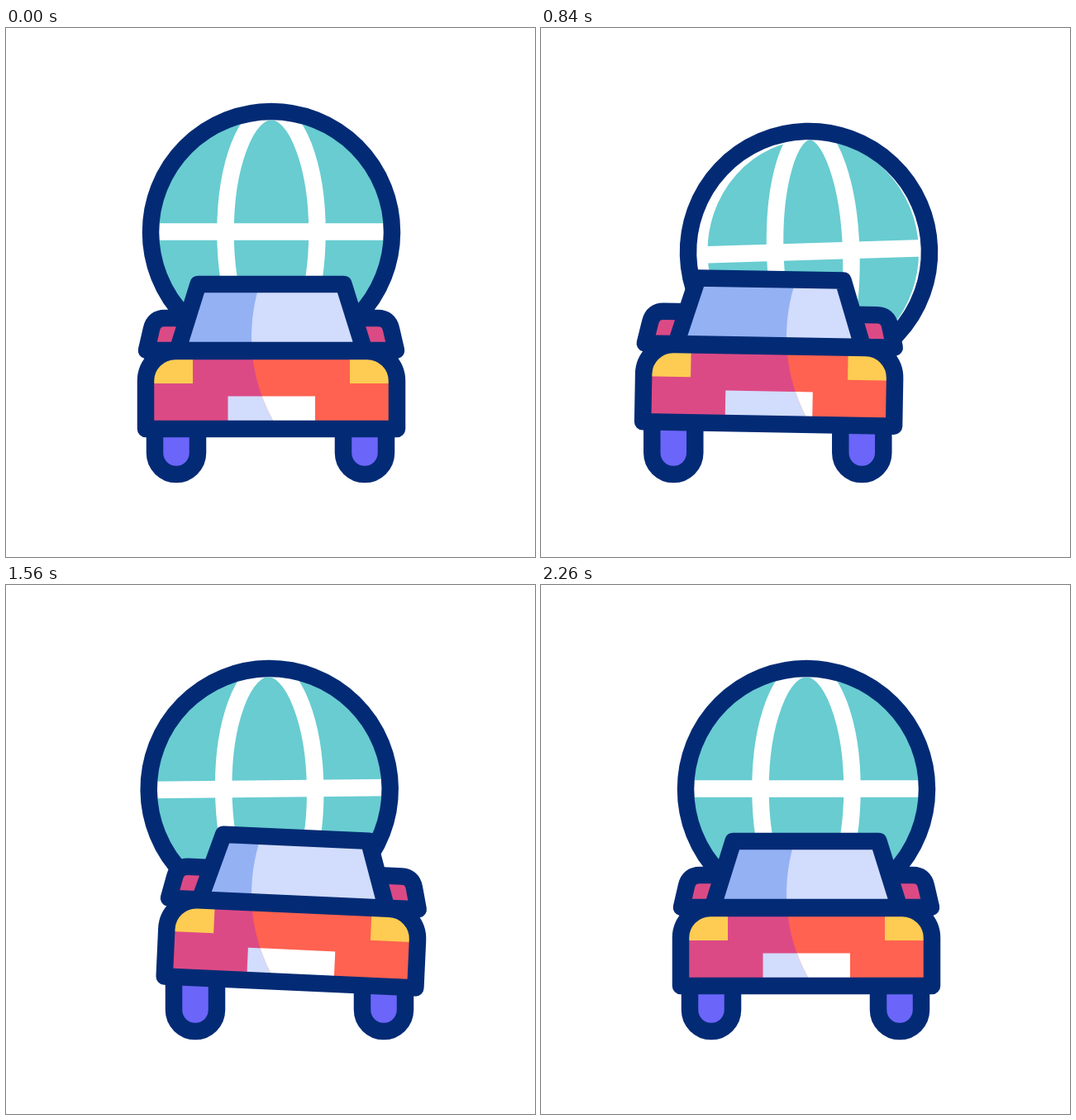
An HTML page with a canvas for the animation above (2.4 s loop, 640 px wide and 640 px high).

```html
<!DOCTYPE html>
<html lang="en">
<head>
<meta charset="utf-8">
<title>Car and globe</title>
<style>
  html, body { margin: 0; width: 100%; height: 100%; overflow: hidden; background: #fff; }
  canvas { display: block; width: 640px; height: 640px; }
</style>
</head>
<body>
<canvas id="stage" width="640" height="640"></canvas>
<script>
const ctx = document.getElementById('stage').getContext('2d');
const LOOP = 2400;
const NAVY = '#032b75', TEAL = '#68ccd1', WHITE = '#fff', RED = '#ff6250', PINK = '#dc4a85',
      YELLOW = '#fecc52', VIOLET = '#6b65f9', PALE = '#d2dcfc', BLUE = '#94b1f4';
const RAD = Math.PI / 180;

// Eased progress from 0 to 1 between two times.
function ease(t, from, to) {
  const u = Math.min(1, Math.max(0, (t - from) / (to - from)));
  return u * u * (3 - 2 * u);
}

// The globe makes one eased trip round a lopsided circle.
function globePose(t) {
  const a = 2 * Math.PI * ease(t, 0, 1700);
  const s = Math.sin(a), k = (1 - Math.cos(a)) / 2;
  return { x: 20 * s + 5 * s * s + 2 * k * k, y: 24 * k, tilt: 5 * s - 2 * k * k };
}

// Suspension turning points: time, drop, tilt.
const bounces = [[540, 15.5, -1.6], [840, -6, 1], [1160, 7, -0.8], [1560, -4.5, 2.6], [2020, 6, -1.2], [2260, 0, 0]];

function carPose(t) {
  const x = -50 * ease(t, 0, 830) + 73 * ease(t, 760, 1310) - 23 * ease(t, 1560, 2010);
  let y = 0, tilt = 0, last = 0;
  for (const [time, drop, lean] of bounces) {
    const u = ease(t, last, time);
    y += (drop - y) * u;
    tilt += (lean - tilt) * u;
    last = time;
  }
  return { x, y, tilt };
}

const body = new Path2D('M169 485V427A36 36 0 0 1 205 391H437A36 36 0 0 1 473 427V485Z');
const cabin = new Path2D('M232.5 310H408.5L433.5 390H207.5Z');
const mirrors = new Path2D(
  'M250 351H192Q179 351 176 364L170 390H250Z M392 351H450Q463 351 466 364L472 390H392Z');
const split = new Path2D();
split.arc(507, 373.6, 210, 0, 7);

function layer(draw) {
  ctx.save();
  draw();
  ctx.restore();
}

function paint(path, fill) {
  ctx.fillStyle = fill;
  ctx.fill(path);
}

function outline(path, color = NAVY) {
  ctx.strokeStyle = color;
  ctx.stroke(path);
}

function line(x0, y0, x1, y1, color) {
  const p = new Path2D();
  p.moveTo(x0, y0);
  p.lineTo(x1, y1);
  outline(p, color);
}

function place(cx, cy, pose) {
  ctx.translate(cx + pose.x, cy + pose.y);
  ctx.rotate(pose.tilt * RAD);
}

function drawGlobe(t) {
  const pose = globePose(t);
  const turn = ease(t, 0, 400) - ease(t, 860, 1140);
  const gap = 111 - 19 * turn, shift = -3 * pose.tilt * turn;
  const disc = new Path2D();
  disc.arc(0, 0, 146, 0, 2 * Math.PI);

  place(321, 247, pose);
  paint(disc, TEAL);
  layer(() => {
    ctx.clip(disc);
    line(-146, -0.5, 146, -0.5, WHITE);
    for (const k of [0.5, 1.5]) {
      const p = new Path2D();
      p.ellipse(shift, 0, gap * k, 146, 0, 0, 2 * Math.PI);
      outline(p, WHITE);
    }
  });
  outline(disc);
}

function drawRays(t) {
  const tip = ease(t, 866, 1206), tail = ease(t, 994, 1334);
  if (tip - tail < 0.001) return;
  for (const i of [-1, 0, 1]) {
    const angle = (45.5 * i - 34) * RAD, length = i ? 42 : 54;
    const r0 = 44 + length * tail, r1 = 44 + length * tip;
    const c = Math.cos(angle), s = Math.sin(angle);
    line(446 + r0 * c, 176 + r0 * s, 446 + r1 * c, 176 + r1 * s, YELLOW);
  }
}

function drawWheel(x) {
  const p = new Path2D();
  p.roundRect(x - 26, 430, 52, 110, [0, 0, 26, 26]);
  paint(p, VIOLET);
  outline(p);
}

function drawPaintwork(shell, glass, plate) {
  paint(body, shell);
  paint(cabin, glass);
  ctx.fillStyle = plate;
  ctx.fillRect(268.5, 445.5, 105.5, 32);
}

function drawCar(t) {
  const pose = carPose(t);
  const onBody = draw => {
    place(321, 475, pose);
    ctx.translate(-321, -475);
    draw();
  };
  layer(() => {
    ctx.translate(pose.x, 0);
    drawWheel(206);
    drawWheel(434);
  });
  layer(() => onBody(() => {
    paint(mirrors, PINK);
    outline(mirrors);
    drawPaintwork(PINK, BLUE, PALE);
  }));
  // The lit area stays put while the car moves through it.
  layer(() => {
    ctx.clip(split);
    onBody(() => drawPaintwork(RED, PALE, WHITE));
  });
  layer(() => onBody(() => {
    layer(() => {
      ctx.clip(body);
      ctx.fillStyle = YELLOW;
      ctx.fillRect(169, 391, 57, 39);
      ctx.fillRect(416, 391, 57, 39);
    });
    outline(body);
    outline(cabin);
  }));
}

function frame() {
  const t = performance.now() % LOOP;
  ctx.fillStyle = WHITE;
  ctx.fillRect(0, 0, 640, 640);
  ctx.lineWidth = 20.5;
  ctx.lineCap = ctx.lineJoin = 'round';
  layer(() => drawGlobe(t));
  drawRays(t);
  drawCar(t);
  requestAnimationFrame(frame);
}
frame();
</script>
</body>
</html>
```
